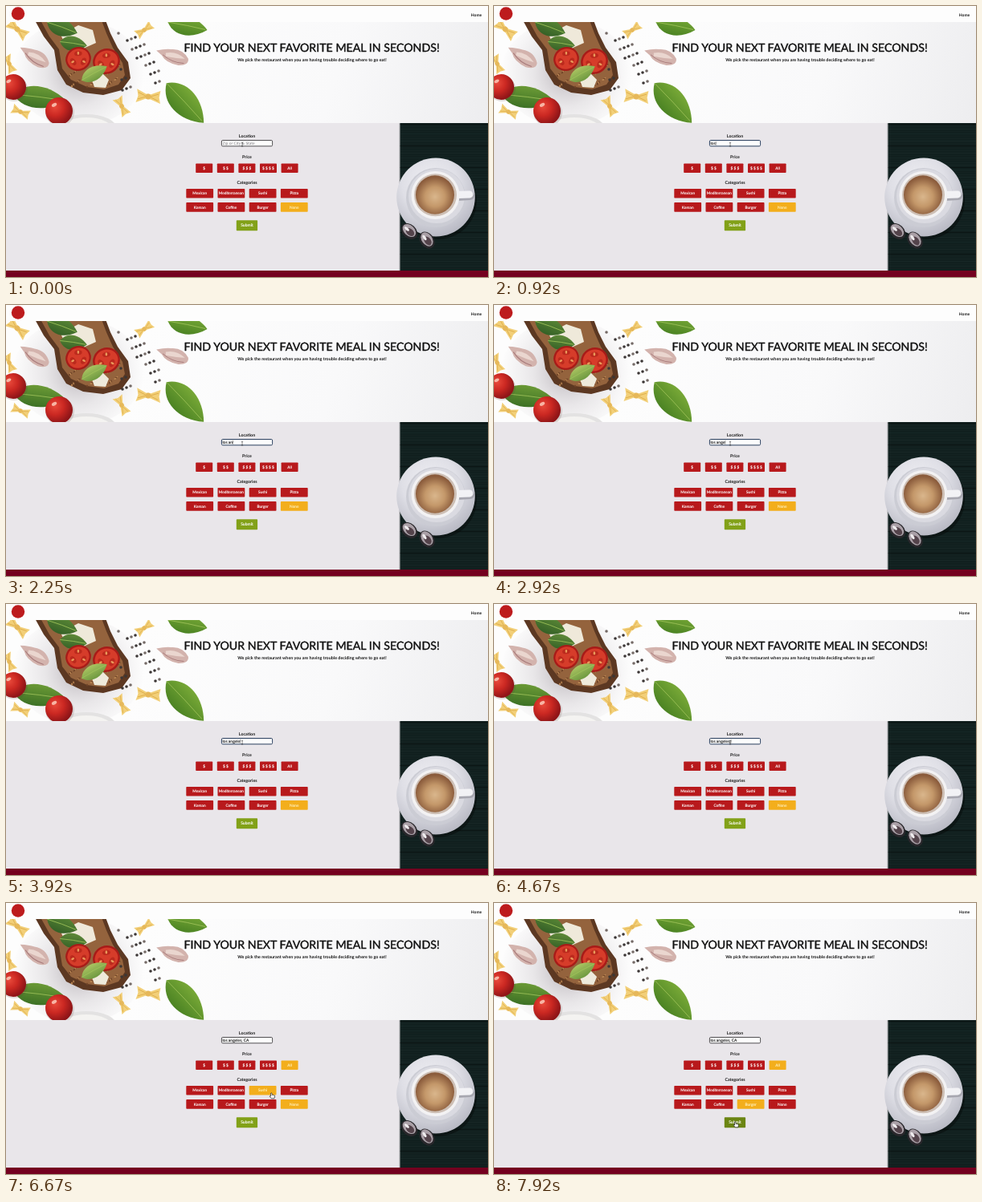
Write an HTML page with a canvas that moves like this. It is 600x338 px and loops after 8000 ms.

```html
<!DOCTYPE html>
<html lang="en">
<head>
<meta charset="utf-8">
<title>Meal picker</title>
<style>
  html, body { margin: 0; width: 100%; height: 100%; overflow: hidden; background: #fff; }
  canvas { display: block; width: 600px; height: 338px; }
</style>
</head>
<body>
<canvas id="stage" width="600" height="338"></canvas>
<script>
const LOOP = 8000;
const RED = '#b8191c', YELLOW = '#f3ae1c', INK = '#161616';
const stage = document.getElementById('stage').getContext('2d');
const backdrop = document.createElement('canvas');
backdrop.width = 600;
backdrop.height = 338;
let c = backdrop.getContext('2d');

function rect(x, y, w, h, fill, radius = 0) {
  c.fillStyle = fill;
  c.beginPath();
  c.roundRect(x, y, w, h, radius);
  c.fill();
}

function oval(x, y, rx, ry, fill, angle = 0) {
  c.fillStyle = fill;
  c.beginPath();
  c.ellipse(x, y, rx, ry, angle, 0, Math.PI * 2);
  c.fill();
}

// "heft" thickens the regular weight towards a semibold
function text(str, x, y, size, { color = INK, weight = 400, align = 'center', heft = 0 } = {}) {
  c.font = `${weight} ${size}px Lato, "Open Sans", sans-serif`;
  c.textRendering = 'geometricPrecision';
  c.textAlign = align;
  c.textBaseline = 'alphabetic';
  c.fillStyle = c.strokeStyle = color;
  c.fillText(str, x, y);
  if (!heft) return;
  c.lineWidth = heft;
  c.lineJoin = 'round';
  c.strokeText(str, x, y);
}

function at(x, y, angle, draw) {
  c.save();
  c.translate(x, y);
  c.rotate(angle);
  draw();
  c.restore();
}

function shade(x, y, r, ...colors) {
  const g = c.createRadialGradient(x, y, 0, x, y, r);
  colors.forEach((color, i) => g.addColorStop(i / (colors.length - 1), color));
  return g;
}

function shape(path, fill, stroke, width = 1) {
  const p = new Path2D(path);
  if (fill) { c.fillStyle = fill; c.fill(p); }
  if (stroke) { c.strokeStyle = stroke; c.lineWidth = width; c.stroke(p); }
}

// Food on the hero banner
function leaf(x, y, length, width, angle, light = '#7fae3a', dark = '#447d20') {
  at(x, y, angle, () => {
    const l = length / 2, w = width * 0.72;
    const g = c.createLinearGradient(0, -w, 0, w);
    g.addColorStop(0, light);
    g.addColorStop(1, dark);
    shape(`M${-l} 0C${-l * .6} ${-w} ${l * .3} ${-w} ${l} 0C${l * .3} ${w} ${-l * .6} ${w} ${-l} 0Z`, g);
    shape(`M${-l} 0Q0 -1 ${l * .9} 0`, null, '#9fc35a', 0.8);
  });
}

function tomato(x, y, r) {
  oval(x + 1, y + 2, r + 1, r, 'rgba(90,60,50,.16)');
  oval(x, y, r, r, shade(x - r * .3, y - r * .3, r * 1.3, '#e8493a', '#cb2822', '#8f1518'));
  oval(x - r * .35, y - r * .45, r * .2, r * .12, '#f8b4a4', -0.5);
}

function tomatoHalf(x, y, r) {
  oval(x, y, r, r * .93, '#a81b18', -0.4);
  oval(x, y, r * .86, r * .78, '#d63c2a', -0.4);
  for (let i = 0; i < 3; i++) {
    const a = i * 2.1 + .5;
    oval(x + Math.cos(a) * r * .46, y + Math.sin(a) * r * .42, r * .3, r * .19, '#bb2a1d', a + 1.5);
    oval(x + Math.cos(a) * r * .5, y + Math.sin(a) * r * .45, r * .13, r * .08, '#e9985a', a);
  }
}

function bowtie(x, y, size, angle) {
  at(x, y, angle, () => {
    c.scale(size, size);
    shape('M-14-8L-3-3L3-3L14-8L13 0L15 7L3 3L-3 3L-14 8L-12 0Z', '#f2cf78');
    shape('M-12-4L-2 0L-12 4M12-4L2 0L12 4', null, '#dfae4c', 0.9);
    oval(0, 0, 3, 3.4, '#e6b85a');
  });
}

function garlic(x, y, angle) {
  at(x, y, angle, () => {
    shape('M-22-2Q-12-7-5-8Q9-13 19-2Q22 6 9 9Q-7 10-14 2Z', '#d3b3ad');
    shape('M-10-2Q2-8 15-1Q6 1-9 2Z', '#ead6cf');
    shape('M-13 1Q0 8 15 5', null, '#a87a7a', 1);
  });
}

function hero() {
  const g = c.createLinearGradient(180, 20, 600, 146);
  g.addColorStop(0, '#fdfdfd');
  g.addColorStop(.55, '#f9f9fa');
  g.addColorStop(1, '#ededef');
  c.save();
  c.beginPath();
  c.rect(0, 20, 600, 126);
  c.clip();
  rect(0, 20, 600, 126, g);

  oval(90, 84, 82, 66, shade(90, 84, 82, 'rgba(120,110,120,.5)', 'rgba(150,140,150,.2)', 'rgba(160,150,160,0)'));
  oval(100, 153, 38, 18, '#e3e2e2');
  oval(100, 156, 34, 17, '#f4f3f1');
  bowtie(14, 29, 1, 0.7);
  bowtie(4, 72, .8, 1.2);
  bowtie(18, 132, .8, 0.4);
  bowtie(144, 125, .85, 1.1);
  bowtie(177, 113, 1.05, 0.1);
  bowtie(172, 30, .8, -0.6);
  garlic(36, 64, 0.5);
  garlic(208, 63, 0.25);

  shape('M36 18L47 38L60 55L64 80L75 98L96 108L121 111L144 105L155 90L152 70L139 52L130 34L124 18Z', '#5c3822');
  shape('M43 18L54 38L66 54L70 78L81 92L101 101L122 104L140 98L148 86L145 71L133 52L125 34L119 18Z', '#94633d');
  for (let i = 0; i < 60; i++) {
    const x = 78 + (i * 37) % 64, y = 72 + (i * 19) % 30;
    oval(x, y, 1.6, 1, i % 2 ? '#6f4428' : '#ba8653', i);
  }
  shape('M68 36L90 24L108 30L112 46L94 54L76 52Z', '#efe9da');
  shape('M104 84L116 80L128 92L124 102L110 101Z', '#eeeadb');
  leaf(70, 27, 40, 20, 0.35, '#5f8d38', '#2f5a24');
  leaf(84, 47, 34, 17, 0.15, '#658f3c', '#315e24');
  tomatoHalf(90, 66, 16);
  tomatoHalf(125, 69, 17);
  leaf(110, 84, 36, 16, -0.5, '#b3cb67', '#64923a');

  leaf(42, 114, 66, 25, 0.12, '#72a038', '#356a22');
  tomato(9, 101, 16);
  tomato(66, 131, 17);
  leaf(226, 25, 50, 22, 0.2);
  leaf(223, 121, 68, 30, 0.82);

  for (let i = 0; i < 26; i++) {
    const x = 140 + (i * 23) % 52, y = 34 + (i * 31) % 73;
    oval(x, y, 1.8, 1.7, i % 3 ? '#3b3635' : '#746a66');
  }
  c.restore();

  text('FIND YOUR NEXT FAVORITE MEAL IN SECONDS!', 380.6, 56.6, 14.2, { color: '#111', heft: .4 });
  text('We pick the restaurant when you are having trouble deciding where to go eat!', 381, 68.7, 5.4, { weight: 700 });
}

function coffee() {
  rect(489.5, 146, 1, 184, '#a9a8ab');
  rect(490.5, 146, 109.5, 184, '#11201f');
  for (let i = 0; i < 61; i++)
    rect(490.5, 147 + i * 3, 109.5, .8, i % 9 ? `rgba(70,92,92,${.04 + (i * 7 % 5) * .03})` : 'rgba(0,0,0,.5)');

  oval(538, 243, 48, 48, 'rgba(0,0,0,.35)');
  oval(535, 238.5, 48.8, 49, shade(528, 222, 70, '#f0f0f4', '#dfdfe6', '#b4b5c0'));
  oval(535, 239, 37, 37, '#cbccd4');
  oval(536, 237, 35, 34, '#dadae1');
  c.lineCap = 'round';
  shape('M562 238L578 237', null, '#a7a7b0', 10);
  shape('M562 235.5L577 235', null, '#f2f2f5', 9);
  oval(534.5, 236, 30, 30, '#f3f2f3');
  oval(534.5, 235.8, 26.5, 26.5, '#cdbfb5');
  oval(534, 235.5, 24, 24.2, shade(534, 238, 24.5, '#d9b68c', '#c4986a', '#8b5c3c'));

  for (const [x, y, angle] of [[502, 281, 0.75], [524, 292, 0.95]]) {
    oval(x, y, 11.5, 8.5, '#29272b', angle);
    oval(x, y - 1, 9.5, 6.5, '#aaa0a7', angle);
    oval(x + 1, y + 1, 6, 4, '#54434b', angle);
    oval(x - 3, y - 3, 3.6, 1.6, '#f0edef', angle);
  }
}

function page() {
  rect(0, 0, 600, 338, '#e9e6ea');
  rect(0, 0, 600, 20, '#fdfdfd');
  oval(15, 9.5, 8.2, 8.2, '#bd1b1d');
  text('Home', 585.5, 12.6, 5, { weight: 700 });
  hero();
  coffee();
  rect(0, 330, 600, 8, '#74001f');
  text('Location', 300, 164.4, 5.3, { weight: 700 });
  text('Price', 300, 190.1, 5.3, { weight: 700 });
  text('Categories', 300, 222, 5.3, { weight: 700 });
}

// Controls
const button = (label, x, y, w, h = 11.6) => ({ label, x, y, w, h });
const prices = ['$', '$ $', '$ $ $', '$ $ $ $', 'All']
  .map((label, i) => button(label, 236.2 + i * 26.6, 196.4, 21));
const categories = ['Mexican', 'Mediterranean', 'Sushi', 'Pizza', 'Korean', 'Coffee', 'Burger', 'None']
  .map((label, i) => button(label, 224.3 + (i % 4) * 39.2, i < 4 ? 227.9 : 245.1, 33.8));
const submit = button('Submit', 286.8, 267.2, 26.3, 13);
const field = { x: 268.4, y: 167.5, w: 63.2, h: 7.3 };

const ENTRY = 'los angeles, CA';
const keyTimes = [580, 750, 920, 1170, 1420, 2080, 2580, 2830, 3330, 3580, 4080, 4670, 4750, 4830, 5000];
const FOCUS = 80, PICK_PRICE = 5670, PICK_CATEGORY = 7170;

// Pointer positions: time, x, y
const pointerStops = [
  [0, 294, 172.6], [5420, 312, 183], [5500, 338, 194], [5670, 351, 202],
  [5920, 352, 204], [6000, 351, 208], [6250, 347, 217], [6330, 342, 224],
  [6500, 335, 232], [6670, 330.3, 237.3], [6830, 326, 243], [7000, 322, 250],
  [7330, 321, 252], [7420, 318, 255], [7500, 315, 260], [7670, 308, 267],
  [7750, 303, 271], [7920, 300.2, 273.3]
];

const inside = (b, x, y) => x >= b.x && x <= b.x + b.w && y >= b.y && y <= b.y + b.h;

function drawButton(b, fill) {
  rect(b.x, b.y, b.w, b.h, fill, .8);
  const color = fill === YELLOW ? '#fff0bd' : '#fff';
  text(b.label, b.x + b.w / 2, b.y + b.h / 2 + 1.7, b === submit ? 5.1 : 4.8, { color, heft: .15 });
}

function drawField(t) {
  const focused = t >= FOCUS && t < PICK_PRICE;
  const { x, y, w, h } = field;
  rect(x, y, w, h, '#fff', 1.4);
  c.strokeStyle = focused ? '#2b405f' : '#343236';
  c.lineWidth = focused ? 1 : .85;
  c.beginPath();
  c.roundRect(x, y, w, h, 1.4);
  c.stroke();

  const count = keyTimes.filter(k => k <= t).length;
  const value = ENTRY.slice(0, count);
  text(value || 'Zip or City & State', 269.4, 172.9, 5, {
    align: 'left', color: value ? INK : '#77757a', heft: value ? .12 : 0
  });
  const lastKey = count ? keyTimes[count - 1] : FOCUS;
  if (focused && (t - lastKey) % 1000 < 500) {
    const end = value ? c.measureText(value).width : 0;
    rect(269.7 + end, 168.8, .5, 4.8, INK);
  }
}

function drawPointer(x, y, kind) {
  at(x, y, 0, () => {
    c.lineJoin = 'round';
    if (kind === 'text')
      shape('M-1.1-2.2Q0-2.2 0-1.5Q0-2.2 1.1-2.2M0-1.5L0 2M-1.1 2.6Q0 2.6 0 2Q0 2.6 1.1 2.6', null, '#222', .55);
    else if (kind === 'hand')
      shape('M-.7 0Q.2-.8.8.1L1 2.1L2.3 2.1L3.5 2.6Q4.5 2.8 4.3 4L3.6 6.5L.1 6.5L-2.1 3.9Q-2.1 2.8-.6 3.7Z', '#fff', '#171717', .7);
    else
      shape('M0 0L0 6.2L1.5 4.8L2.6 7L3.6 6.5L2.6 4.4L4.5 4.4Z', '#111', '#fff', .5);
  });
}

function render(t) {
  c = stage;
  c.drawImage(backdrop, 0, 0);
  const [, x, y] = pointerStops.findLast(stop => stop[0] <= t);
  const hovered = [...prices, ...categories, submit].find(b => inside(b, x, y));
  const category = t < PICK_CATEGORY ? 'None' : 'Burger';
  const price = t < PICK_PRICE ? '' : 'All';

  drawField(t);
  for (const b of [...prices, ...categories]) {
    const active = b === hovered || b.label === price || b.label === category;
    drawButton(b, active ? YELLOW : RED);
  }
  drawButton(submit, hovered === submit ? '#6b8512' : '#82a118');
  drawPointer(x, y, hovered ? 'hand' : inside(field, x, y) ? 'text' : 'arrow');
}

function tick() {
  render(performance.now() % LOOP);
  requestAnimationFrame(tick);
}

page();
tick();
</script>
</body>
</html>
```
